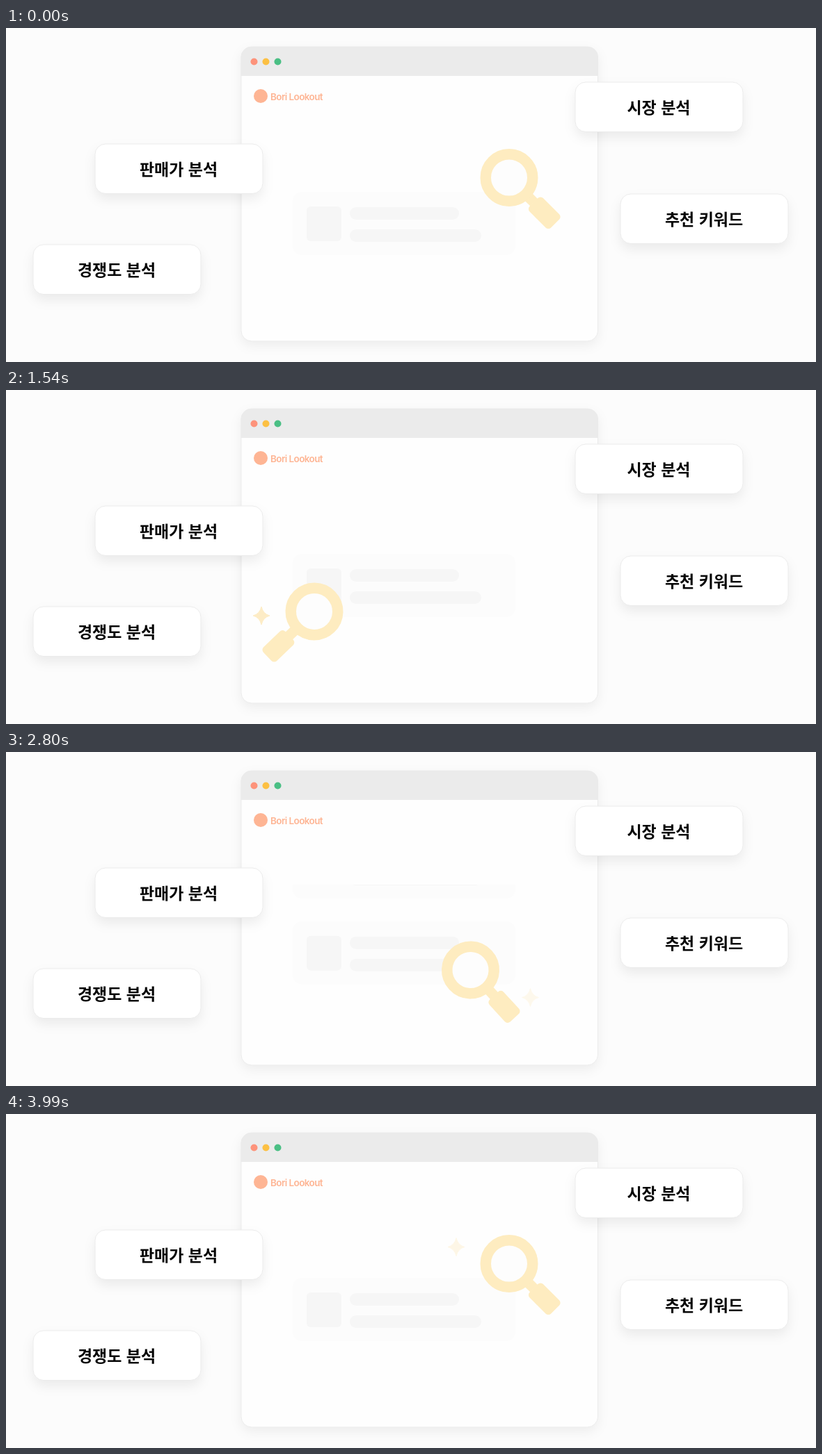
These frames come from a looping animation (1164 px wide and 481 px high, 4.06 s). An HTML page:

```html
<!DOCTYPE html>
<html lang="ko">
<head>
<meta charset="utf-8">
<style>
  html, body { margin: 0; width: 100%; height: 100%; overflow: hidden; background: #fcfcfc; }
  svg { display: block; width: 1164px; height: 481px; }
  .window { filter: drop-shadow(0 6px 8px rgba(0, 0, 0, .06)); }
  .card rect { fill: #fff; stroke: #ebebeb; filter: drop-shadow(0 8px 8px rgba(0, 0, 0, .065)); }
  .card text { font: 700 23px "Noto Sans CJK KR", "Noto Sans CJK", sans-serif; text-anchor: middle; fill: #050505; }
  .brand { font: 600 13.5px Inter, sans-serif; letter-spacing: -.6px; fill: #feb594; }
</style>
</head>
<body>
<svg viewBox="0 0 1164 481">
  <defs>
    <clipPath id="viewport"><rect x="400" y="191" width="345" height="168"/></clipPath>
    <g id="row">
      <rect x="412" width="320" height="91" rx="13" fill="#fcfcfc"/>
      <g fill="#f6f6f6">
        <rect x="432" y="21" width="50" height="50" rx="6"/>
        <rect x="494" y="22" width="157" height="18" rx="9"/>
        <rect x="494" y="54" width="189" height="18" rx="9"/>
      </g>
    </g>
    <path id="star" d="M0-13Q2.5-2.5 12 0Q2.5 2.5 0 13Q-2.5 2.5-12 0Q-2.5-2.5 0-13Z"
      fill="#fcc23f" stroke="#fcc23f" stroke-linejoin="round"/>
  </defs>

  <g class="window">
    <rect x="338" y="27" width="512.5" height="424" rx="15" fill="#fefefe" stroke="#ebebeb"/>
    <path d="M337.5 69V42a15 15 0 0 1 15-15H836a15 15 0 0 1 15 15V69Z" fill="#ebebeb"/>
  </g>
  <circle cx="356.5" cy="48.5" r="5" fill="#fd937b"/>
  <circle cx="373.5" cy="48.5" r="5" fill="#fcc043"/>
  <circle cx="390.5" cy="48.5" r="5" fill="#4abf84"/>
  <circle cx="366" cy="98" r="10" fill="#feb594"/>
  <text class="brand" x="380" y="104">Bori Lookout</text>

  <g clip-path="url(#viewport)">
    <use href="#row" id="leaving"/>
    <use href="#row" id="entering"/>
  </g>
  <g id="stars"></g>
  <g id="lens" fill="#feecc0">
    <rect x="-7.5" y="39" width="15" height="16"/>
    <rect x="-13.75" y="50" width="27.5" height="43.5" rx="5.5"/>
    <circle r="33.75" fill="#fdfdfd" stroke="#feecc0" stroke-width="15.5"/>
  </g>
  <g id="cards"></g>
</svg>
<script>
const LOOP = 4060;
const $ = id => document.getElementById(id);
const clamp = v => Math.max(0, Math.min(1, v));
const smooth = v => { const u = clamp(v); return u * u * (3 - 2 * u); };

const cards = [
  [818, 78, '시장 분석'], [128, 167, '판매가 분석'],
  [883, 239, '추천 키워드'], [39, 312, '경쟁도 분석'],
];
$('cards').innerHTML = cards.map(([x, y, label]) => `
  <g class="card" transform="translate(${x} ${y})">
    <rect width="241" height="71.5" rx="15"/>
    <text x="120" y="45">${label}</text>
  </g>`).join('');

// time, x, y, angle
const lensKeys = [
  [0, 723, 215.5, -45],
  [250, 723, 215.5, -45],
  [560, 591.5, 255.5, -2.4],
  [1000, 443, 319, 46],
  [1580, 443, 319, 46],
  [1680, 474, 318, 33],
  [1890, 583.5, 312, -10.5],
  [2310, 648, 313, -35],
  [2650, 667.5, 314, -42.5],
  [2800, 667.5, 314, -42.5],
  [3360, 716, 228, -44.7],
  [3550, 723, 215.5, -45],
  [LOOP, 723, 215.5, -45],
];
const scrollStarts = [450, 1130, 1812, 2467, 3330];
const SCROLL = 400;
// start, duration, x, y
const stars = [
  [900, 750, 367, 325],
  [1870, 980, 753.5, 353.5],
  [3340, 700, 647, 191.5],
];
const starNodes = stars.map(() => {
  const node = document.createElementNS('http://www.w3.org/2000/svg', 'use');
  node.setAttribute('href', '#star');
  return $('stars').appendChild(node);
});

// Monotone cubic interpolation keeps rests still and turns smooth.
function slope(keys, i, c) {
  if (i === 0 || i === keys.length - 1) return 0;
  const rate = k => (keys[k + 1][c] - keys[k][c]) / (keys[k + 1][0] - keys[k][0]);
  const a = rate(i - 1), b = rate(i);
  return a * b <= 0 ? 0 : 2 * a * b / (a + b);
}

function sample(keys, t, c) {
  const i = keys.findIndex((k, n) => n < keys.length - 1 && t < keys[n + 1][0]);
  const [p, q] = [keys[i], keys[i + 1]];
  const span = q[0] - p[0], u = (t - p[0]) / span, s = smooth(u);
  return p[c] * (1 - s) + q[c] * s
    + span * u * (1 - u) * ((1 - u) * slope(keys, i, c) - u * slope(keys, i + 1, c));
}

function place(node, transform, opacity = 1) {
  node.setAttribute('transform', transform);
  node.setAttribute('opacity', opacity);
}

function draw(t) {
  const [x, y, angle] = [1, 2, 3].map(c => sample(lensKeys, t, c));
  place($('lens'), `translate(${x} ${y}) rotate(${angle})`);

  const start = scrollStarts.find(s => t >= s && t < s + SCROLL);
  const p = start === undefined ? 0 : smooth((t - start) / SCROLL);
  place($('leaving'), `translate(0 ${236 - 125 * p})`, clamp((1 - p) * 14));
  place($('entering'), `translate(0 ${341 - 105 * p})`, clamp(p * 10));

  stars.forEach(([begin, length, sx, sy], i) => {
    const u = (t - begin) / length;
    const size = smooth(u / .38);
    const opacity = u < 0 || u > 1 ? 0 : 1 - smooth((u - .5) / .55);
    place(starNodes[i], `translate(${sx} ${sy}) rotate(${(1 - size) * 50}) scale(${Math.max(.08, size)})`, opacity);
  });
}

const origin = performance.now();
function tick(now) {
  draw(Math.max(0, now - origin) % LOOP);
  requestAnimationFrame(tick);
}
draw(0);
requestAnimationFrame(tick);
</script>
</body>
</html>
```
